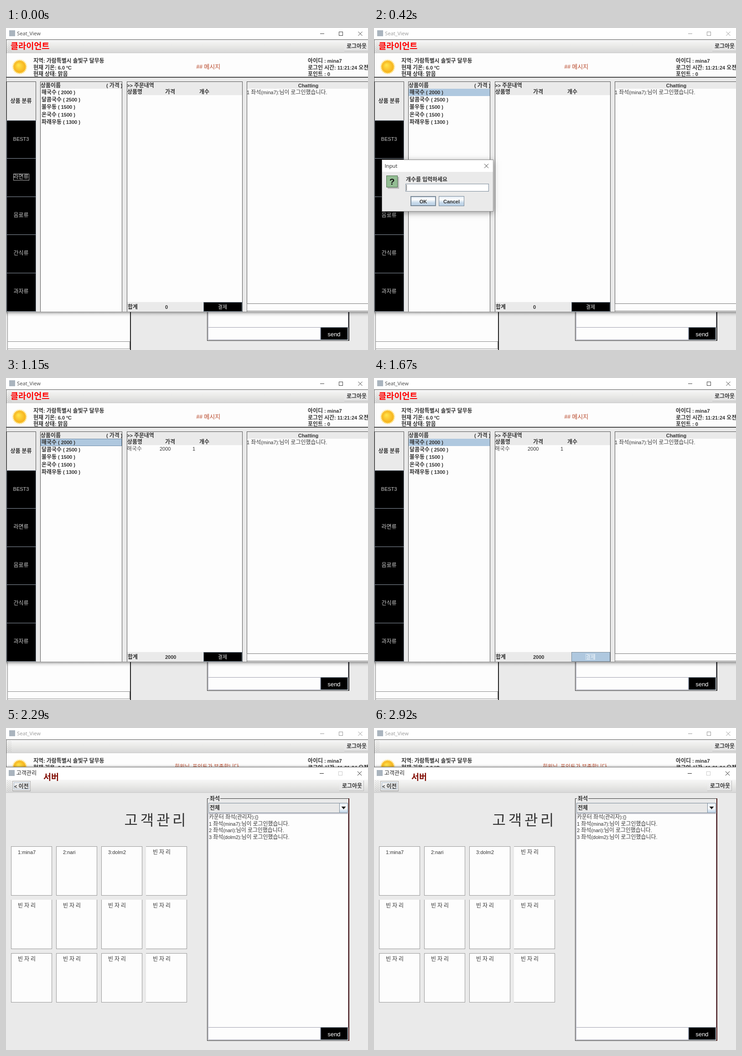
Animation of 794x705 px, one loop 3200 ms. Source, as an HTML page with a canvas:

```html
<!DOCTYPE html>
<html lang="ko">
<head>
<meta charset="utf-8">
<title>Shop client and counter</title>
<style>
html, body { margin: 0; width: 100%; height: 100%; overflow: hidden; background: #eaeaea; }
canvas { display: block; }
</style>
</head>
<body>
<canvas id="stage" width="794" height="705"></canvas>
<script>
const ctx = document.getElementById('stage').getContext('2d');
const LOOP = 3200;
const T = {
  select: 100, dialog: 340, type: 560, close: 670, order: 700,
  press: 1540, release: 1750, mark: 1850, counter: 2290
};
const LATIN = '"Liberation Sans", Arial, sans-serif';
const TITLE = '"Open Sans", sans-serif';
const HANGUL = '"Noto Sans CJK KR", "Noto Sans CJK", sans-serif';
const FACE = '#eaeaea', PAPER = '#fdfdfd', INK = '#333', EDGE = '#7a8a99', PICK = '#afc8df';

const ITEMS = [['해국수', 2000], ['달콤국수', 2500], ['불우동', 1500], ['온국수', 1500], ['파래우동', 1300]];
const SEATS = ['mina7', 'nari', 'dolm2'];

function rect(x, y, w, h, color) {
  ctx.fillStyle = color;
  ctx.fillRect(x, y, w, h);
}

function frame(x, y, w, h, color, line = 1) {
  ctx.strokeStyle = color;
  ctx.lineWidth = line;
  ctx.strokeRect(x + line / 2, y + line / 2, w - line, h - line);
}

function box(x, y, w, h, fill, edge) {
  rect(x, y, w, h, fill);
  frame(x, y, w, h, edge);
}

function shade(y, h, ...colors) {
  const g = ctx.createLinearGradient(0, y, 0, y + h);
  colors.forEach((c, i) => g.addColorStop(i / (colors.length - 1), c));
  return g;
}

// Hangul and Latin runs use separate fonts; cy is the vertical centre.
function text(s, x, cy, { size = 11, bold = false, color = INK, center = false, latin = LATIN } = {}) {
  const weight = bold ? 'bold ' : '';
  const runs = s.match(/[가-힣]+|[^가-힣]+/g).map(part => {
    const font = /[가-힣]/.test(part)
      ? `${weight}${size / 0.92}px ${HANGUL}` : `${weight}${size}px ${latin}`;
    ctx.font = font;
    return { part, font, w: ctx.measureText(part).width };
  });
  if (center) x -= runs.reduce((sum, r) => sum + r.w, 0) / 2;
  ctx.fillStyle = color;
  for (const r of runs) {
    ctx.font = r.font;
    ctx.fillText(r.part, x, cy + size * 0.37);
    x += r.w;
  }
}

const bold = (s, x, cy, more) => text(s, x, cy, { bold: true, ...more });

function path(color, line, ...points) {
  ctx.strokeStyle = color;
  ctx.lineWidth = line;
  ctx.beginPath();
  for (const [x1, y1, x2, y2] of points) {
    ctx.moveTo(x1, y1);
    ctx.lineTo(x2, y2);
  }
  ctx.stroke();
}

function cross(x, y, color) {
  path(color, 1, [x - 4.5, y - 4.5, x + 4.5, y + 4.5], [x - 4.5, y + 4.5, x + 4.5, y - 4.5]);
}

function titleBar(title, x, y, textColor, color, maxColor) {
  rect(0, y - 12, 794, 26, '#fff');
  rect(Math.round(x), y - 7, 13, 13, '#aab4be');
  text(title, x + 17, y, { size: 11.2, color: textColor, latin: TITLE });
  rect(Math.round(682 + x), y, 9, 1, color);
  frame(Math.round(723 + x), y - 4, 9, 9, maxColor);
  cross(770 + x, y + 0.5, color);
}

function toolBar(y) {
  rect(0, y, 794, 28, shade(y, 28, '#f7f7f7', '#e9e9e7', '#d8d8d8'));
  rect(0, y + 28, 794, 1, '#c8c8c8');
  for (let i = 0; i < 12; i++)
    for (let j = 0; j < 4; j++)
      if ((i + j) % 2 === 0) rect(3 + j * 2.5, y + 2 + i * 2.1, 1, 1, '#aaa');
}

function toolButton(x, y, w, label, lx) {
  rect(x, y, w, 23, shade(y, 23, '#f4f4f4', '#e2e2e2'));
  rect(x + w - 1, y, 1, 23, '#bbb');
  rect(x, y + 22, w, 1, '#bbb');
  bold(label, lx, y + 12);
}

function sun(x, y) {
  const glow = ctx.createRadialGradient(x, y, 11, x, y, 18);
  glow.addColorStop(0, 'rgba(255,205,60,.75)');
  glow.addColorStop(1, 'rgba(255,225,120,0)');
  rect(x - 18, y - 18, 36, 36, glow);
  ctx.fillStyle = '#fbc93b';
  ctx.beginPath();
  for (let i = 0; i < 48; i++) {
    const a = i * Math.PI / 24, r = i % 2 ? 13 : 15.5;
    ctx.lineTo(x + r * Math.cos(a), y + r * Math.sin(a));
  }
  ctx.fill();
  const core = ctx.createRadialGradient(x - 3, y - 4, 1, x, y, 13);
  core.addColorStop(0, '#ffe34a');
  core.addColorStop(1, '#f6b01c');
  ctx.fillStyle = core;
  ctx.beginPath();
  ctx.arc(x, y, 12.5, 0, 7);
  ctx.fill();
}

function message(t) {
  const color = '#b8482a';
  if (t < T.release) return text('## 메시지', 417.5, 85, { size: 12, color });
  text('회원님, 포인트가 부족합니다.', 370, 85, { color });
  if (t >= T.mark && t < T.counter) frame(358, 71, 165, 30, '#f00', 4);
}

function categories(t) {
  box(1, 117, 65, 86, FACE, '#555');
  bold('상품 분류', 33, 160, { center: true });
  ['BEST3', '라면류', '음료류', '간식류', '과자류'].forEach((name, i) => {
    const y = 202 + i * 83.6, top = Math.round(y - 0.4);
    box(1, top, 65, Math.round(y + 83.2) - top + 1, '#000', '#8e98a4');
    text(name, 33, y + 40.5, { color: '#ccc', center: true });
  });
  if (t < T.select) frame(16, 319, 35, 15, '#aaa');
}

function itemList(t, active) {
  box(75, 117, 180, 505, PAPER, '#555');
  rect(76, 118, 178, 15, FACE);
  bold('상품이름', 76, 125.5);
  bold('( 가격 )', 220, 125.5);
  if (t >= T.select) {
    rect(76, 133, 178, 16, PICK);
    if (active && t < T.press) frame(76, 133, 178, 16, '#6f8dab');
  }
  ITEMS.forEach(([name, price], i) => bold(`${name} ( ${price} )`, 78, 141 + i * 16.2));
}

function orders(t) {
  const filled = t >= T.order && t < T.release;
  const pressed = t >= T.press && t < T.release;
  box(265, 117, 254, 505, PAPER, '#555');
  rect(266, 118, 252, 29, FACE);
  bold('>> 주문내역', 265, 125.5);
  bold('상품명', 266, 140);
  bold('가격', 349, 140);
  bold('개수', 424, 140);
  if (filled) {
    text(ITEMS[0][0], 265, 155, { color: '#555' });
    text('2000', 337, 155);
    text('1', 409, 155);
  }
  rect(266, 600, 252, 21, FACE);
  bold('합계', 267, 611);
  bold(filled ? '2000' : '0', 349, 611);
  box(433, 600, 85, 21, pressed ? PICK : '#000', EDGE);
  text('결제', 475, 611, { size: 10, color: pressed ? '#f4f8fc' : '#ddd', center: true });
  if (t >= T.press) frame(464, 604, 21, 13, pressed ? '#d4e2ee' : '#aaa');
}

function chat() {
  box(528, 117, 270, 505, PAPER, '#555');
  rect(529, 118, 265, 15, FACE);
  bold('Chatting', 663, 126, { center: true });
  text(`1 좌석(${SEATS[0]}):님이 로그인했습니다.`, 528, 140.5);
  frame(528, 603, 270, 17, '#777');
}

function client(t) {
  const inDialog = t >= T.dialog && t < T.close;
  const active = !inDialog && t < T.counter;
  const tone = active ? '#444' : '#999';
  rect(0, 622, 794, 10, shade(622, 10, 'rgba(0,0,0,.32)', 'rgba(0,0,0,.08)', 'rgba(0,0,0,0)'));
  rect(0, 0, 794, 622, FACE);
  titleBar('Seat_View', 7, 12, tone, tone, tone);
  rect(0, 25, 794, 1, '#555');
  toolBar(26);
  if (t < T.counter) bold('클라이언트', 10, 39.5, { size: 17.1, color: '#f00' });
  toolButton(742, 28, 53, '로그아웃', 747);
  rect(0, 55, 794, 53, PAPER);
  rect(0, 107, 794, 1.5, '#111');
  sun(30, 85);
  bold('지역: 가람특별시 솔빛구 달무동', 60, 71.5);
  bold('현재 기온: 6.0 ºC', 60, 86.5);
  bold('현재 상태: 맑음', 60, 100.5);
  message(t);
  bold(`아이디 : ${SEATS[0]}`, 662, 72);
  bold('로그인 시간: 11:21:24 오전', 662, 86.5);
  bold('포인트 : 0', 662, 101);
  categories(t);
  itemList(t, active);
  orders(t);
  chat();
  rect(0, 25, 1, 597, '#666');
  rect(0, 621, 794, 1, '#999');
}

function dialogButton(x, label, line) {
  rect(x, 368, 56, 22, shade(368, 22, '#dde8f3', '#fff', '#c6d9ea', '#b8cfe5'));
  frame(x, 368, 56, 22, EDGE, line);
  bold(label, x + 28, 379.5, { center: true });
}

function dialog(t) {
  ctx.save();
  ctx.globalAlpha = Math.min(1, (t - T.dialog + 30) / 70);
  ctx.shadowColor = 'rgba(0,0,0,.4)';
  ctx.shadowBlur = 12;
  ctx.shadowOffsetY = 3;
  rect(17, 288, 245, 114, FACE);
  ctx.shadowColor = 'transparent';
  rect(17, 288, 245, 27, '#fff');
  frame(17, 288, 245, 114, '#888');
  text('Input', 23.5, 302, { size: 11.2, color: '#222', latin: TITLE });
  cross(246.5, 302, '#333');
  rect(30, 326, 25, 26, '#bbb');
  box(27, 323, 25, 26, '#93bd93', '#4d704d');
  bold('?', 39.5, 336, { size: 19, color: '#111', center: true });
  bold('개수를 입력하세요', 70, 331.5);
  box(69, 341, 183, 17, '#fff', EDGE);
  if (t >= T.type) text('1', 72, 350);
  rect(t < T.type ? 71 : 79, 343, 1, 13, '#555');
  dialogButton(80, 'OK', 2);
  dialogButton(142, 'Cancel', 1);
  ctx.restore();
}

function seats() {
  for (let i = 0; i < 12; i++) {
    const col = i % 4, row = i >> 2;
    const x = Math.round(11 + col * 98.8), y = 259 + row * 117;
    rect(x, y, 90, 108, PAPER);
    if (row !== 1) rect(x, y, 90, 1, '#999');
    if (col < 3) rect(x, y, 1, 108, '#999');
    rect(x + 89, y, 1, 108, '#999');
    rect(x, y + 107, 90, 1, '#999');
    text(i < 3 ? `${i + 1}:${SEATS[i]}` : '빈 자 리', x + 15, y + 12.5);
  }
}

function counterChat(rim) {
  rect(441, 154, 1, 531, '#333');
  rect(441, 154, 4, 1, '#333');
  rect(470, 154, 282, 1, '#333');
  rect(441, 684, 311, 1, '#333');
  rect(751, 154, 2, 531, rim);
  bold('좌석', 447, 155);
  box(444, 164, 306, 22, '#e8e8e8', EDGE);
  box(731, 164, 19, 22, shade(164, 22, '#e4edf5', '#fff', '#b8cfe5'), EDGE);
  ctx.fillStyle = '#222';
  ctx.beginPath();
  ctx.moveTo(735.5, 172);
  ctx.lineTo(745.5, 172);
  ctx.lineTo(740.5, 178);
  ctx.fill();
  bold('전체', 447, 174.5);
  box(443, 187, 308, 469, PAPER, '#a0a0b0');
  const lines = SEATS.map((name, i) => `${i + 1} 좌석(${name}):님이 로그인했습니다.`);
  ['카운터 좌석(관리자):{}', ...lines].forEach((s, i) => text(s, 445, 195 + i * 14.5));
  box(443, 655, 247, 28, PAPER, '#a0a0b0');
  box(690, 655, 60, 28, '#000', EDGE);
  text('send', 719.5, 670.5, { size: 13, color: '#fff', center: true });
}

function counter(rim) {
  rect(0, 80, 794, 6, shade(80, 6, 'rgba(0,0,0,0)', 'rgba(0,0,0,.2)'));
  rect(0, 86, 794, 619, FACE);
  titleBar('고객관리', 5.5, 99, '#222', '#222', '#ccc');
  rect(0, 85, 794, 1, '#777');
  toolBar(113);
  bold('서버', 82, 107.5, { size: 17, color: '#800a00' });
  toolButton(14, 116, 40, '< 이전', 18);
  frame(14, 116, 40, 22, '#aaa');
  frame(17, 119, 34, 15, '#a9bccf');
  toolButton(731, 115, 54, '로그아웃', 737);
  ctx.font = `300 32px ${HANGUL}`;
  ctx.fillStyle = '#333';
  [...'고객관리'].forEach((c, i) => ctx.fillText(c, 259.5 + i * 35.2, 213));
  seats();
  counterChat(rim);
}

function draw(t) {
  if (t >= T.counter) {
    client(t);
    counter('#4a1414');
    return;
  }
  counter('#222');
  rect(3, 600, 269, 105, PAPER);
  rect(3, 600, 1, 105, '#888');
  rect(272, 600, 2, 105, '#222');
  frame(3, 686, 269, 17, '#888');
  client(t);
  if (t >= T.dialog && t < T.close) dialog(t);
}

const start = performance.now();
function tick() {
  draw((performance.now() - start) % LOOP);
  requestAnimationFrame(tick);
}
tick();
</script>
</body>
</html>
```
